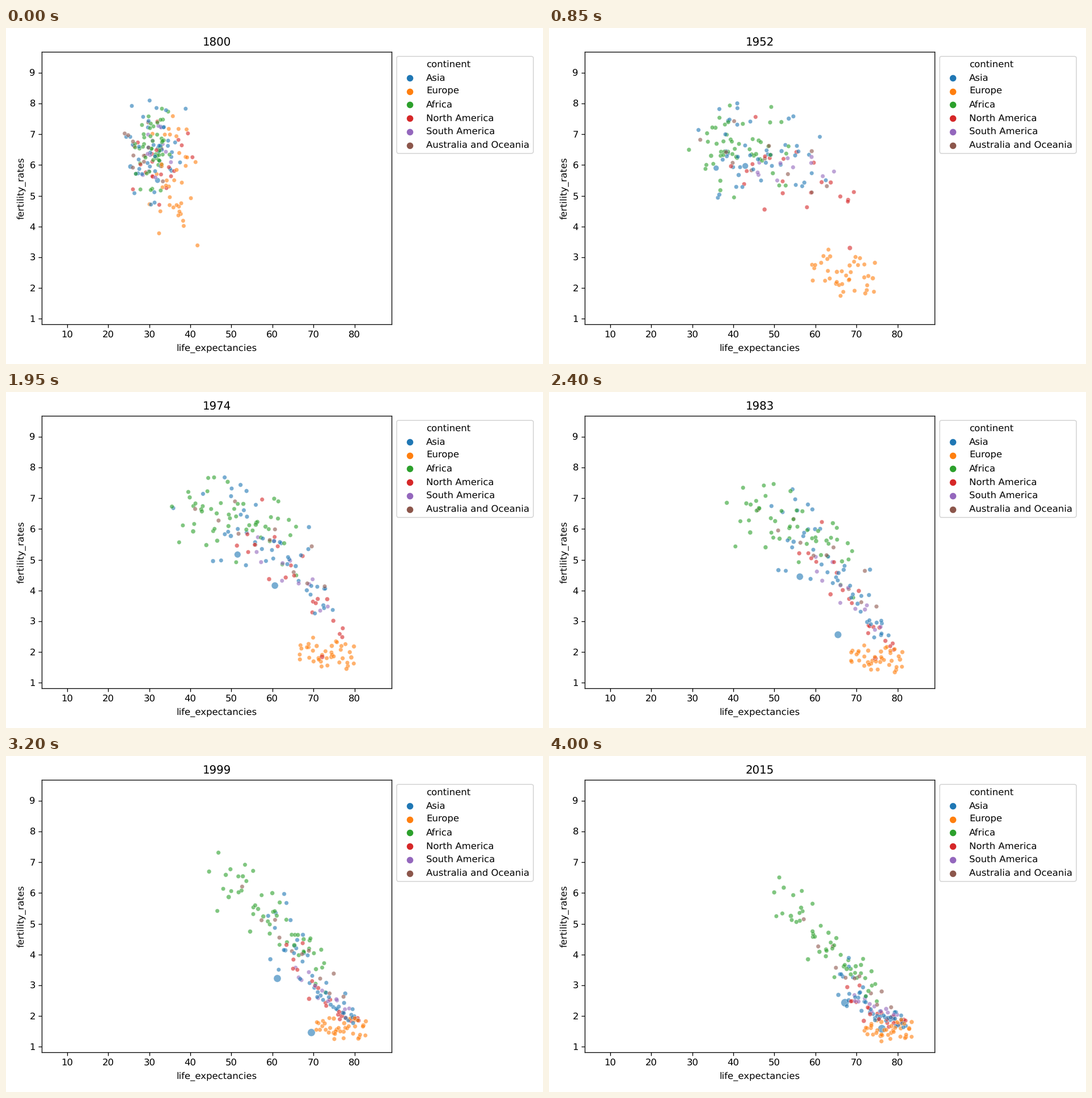
A matplotlib script that plays this animation: 947 px wide and 592 px high, repeating every 4050 ms.

```python
import numpy as np
import matplotlib.pyplot as plt
from matplotlib.animation import FuncAnimation
from matplotlib.colors import to_rgb

W, H = 947, 592
DPI = W / 8
plt.rcParams.update({"font.family": "DejaVu Sans", "text.hinting": "no_hinting"})

ASIA, EUROPE, AFRICA = "tab:blue", "tab:orange", "tab:green"
NORTH, SOUTH, OCEANIA = "tab:red", "tab:purple", "tab:brown"
LABELS = {
    "Asia": ASIA, "Europe": EUROPE, "Africa": AFRICA,
    "North America": NORTH, "South America": SOUTH,
    "Australia and Oceania": OCEANIA,
}

# one step per decade up to 1950, then one per year
YEARS = np.concatenate([np.arange(1800, 1950, 10), np.arange(1950, 2016)])
rng = np.random.default_rng(12)
countries = []


def ease(start, end, mid, width):
    """Logistic change over the years, half done at mid."""
    return start + (end - start) / (1 + np.exp((mid - YEARS) / width))


def dip(year, width):
    return np.exp(-((YEARS - year) / width) ** 2)


def wobble(period):
    return 0.3 * np.sin(YEARS / period + rng.uniform(0, 2 * np.pi))


def add(color, life, rate, people):
    countries.append({"color": color, "life": life, "rate": rate,
                      "area": 20 + 40 * people})


def group(color, n, life, rate, lag, start_gap, end_gap, spread):
    """Countries that make the same transition, early or late.

    life and rate are (start, end, mid, width); lag shifts mid in years.
    """
    for lead in np.linspace(-1.7, 1.7, n):
        u, v, w = np.clip(rng.normal(size=3), -2.1, 2.1)
        x = ease(life[0] + start_gap * w, life[1] + end_gap * lead,
                 life[2] - lag * lead, life[3])
        # late countries also keep a higher final rate
        y = ease(rate[0], rate[1] - 0.22 * (rate[1] - 1.4) * lead,
                 rate[2] - lag * (lead + 0.3 * u), rate[3])
        x = x + 1.3 * (u + wobble(7)) * (90 - x) / 50
        y = y + spread * (v + wobble(11)) * (y - 0.7) / 5
        people = rng.exponential(0.03) * (YEARS - 1800) / 215
        add(color, x, np.maximum(y, 1.14), people)


group(AFRICA, 51, life=(31, 66, 1971, 18), rate=(6.6, 3.6, 2003, 10),
      lag=11, start_gap=2, end_gap=6, spread=0.6)
group(ASIA, 46, life=(31, 77, 1966, 17), rate=(6.5, 1.9, 1989, 9),
      lag=11, start_gap=3, end_gap=3.5, spread=0.65)
group(EUROPE, 39, life=(36, 79, 1930, 23), rate=(5.5, 1.45, 1925, 23),
      lag=5, start_gap=3, end_gap=3.2, spread=0.95)
group(NORTH, 21, life=(31, 77, 1953, 19), rate=(6.2, 1.9, 1981, 10),
      lag=12, start_gap=3.5, end_gap=3.2, spread=0.6)
group(SOUTH, 12, life=(32, 77, 1954, 21), rate=(6.4, 2.1, 1979, 11),
      lag=9, start_gap=1.5, end_gap=2.5, spread=0.5)
group(OCEANIA, 11, life=(28, 71, 1957, 19), rate=(6.4, 2.8, 1990, 13),
      lag=12, start_gap=3, end_gap=5, spread=0.45)

# disasters: (continent, year, life expectancy, duration)
CRISES = [(AFRICA, 1890, 4.3, 0.7), (ASIA, 1920, 15.2, 0.7), (ASIA, 1977, 18.1, 3),
          (AFRICA, 1994, 13.1, 0.7), (NORTH, 2010, 32.2, 0.7)]
for i, (color, year, low, width) in enumerate(CRISES):
    hit = [c for c in countries if c["color"] == color][i]
    depth = np.interp(year, YEARS, hit["life"]) - low
    hit["life"] = hit["life"] - depth * dip(year, width)


def giant(color, people, life, rate, famine=0):
    keys = (1800, 1910, 1952, 1974, 1983, 1999, 2015)
    drop = famine * dip(1960.5, 0.9)
    add(color, np.interp(YEARS, keys, life) - drop,
        np.interp(YEARS, keys, rate) - drop / 9,
        np.interp(YEARS, (1800, 1950, 2015), people))


giant(ASIA, (0.33, 0.55, 1.37), (32, 33, 42.9, 60.6, 65.5, 69.5, 76.2),
      (5.5, 5.5, 5.97, 4.16, 2.56, 1.46, 1.58), famine=23)
giant(ASIA, (0.2, 0.37, 1.3), (25.4, 24, 35.8, 51.5, 56.2, 61.2, 67.2),
      (5.95, 5.75, 5.9, 5.17, 4.45, 3.22, 2.43))
giant(NORTH, (0, 0.15, 0.32), (39.4, 51.8, 68.4, 72.1, 74.6, 76.9, 79),
      (7.03, 3.6, 3.3, 1.84, 1.79, 2.01, 1.97))

countries = [countries[i] for i in rng.permutation(len(countries))]
points = np.array([(c["life"], c["rate"]) for c in countries])
areas = np.array([c["area"] for c in countries])
colors = [to_rgb(c["color"]) for c in countries]

# the tiny surplus keeps the pixel size from rounding down
fig = plt.figure(figsize=((W + 1e-6) / DPI, (H + 1e-6) / DPI), dpi=DPI)
left, right, top, bottom = 63.4, 680.3, 41.7, 522.4
ax = fig.add_axes([left / W, 1 - bottom / H, (right - left) / W, (bottom - top) / H])

ax.scatter([], [], s=0, color="w", label="continent")
for name, color in LABELS.items():
    ax.scatter([], [], color=color, label=name)
dots = ax.scatter(points[:, 0, 0], points[:, 1, 0], s=areas[:, 0], c=colors,
                  alpha=0.6, edgecolors="w", linewidths=0.36)
ax.set(xlim=(3.82, 89.09), ylim=(0.81, 9.69),
       xlabel="life_expectancies", ylabel="fertility_rates")
ax.legend(loc="upper left", bbox_to_anchor=(1, 1))
title = ax.set_title("1800")


def update(i):
    dots.set_offsets(points[:, :, i])
    dots.set_sizes(areas[:, i], DPI)
    title.set_text(str(YEARS[i]))
    return dots, title


anim = FuncAnimation(fig, update, frames=len(YEARS), interval=50,
                     repeat=True, repeat_delay=0)
plt.show()
```
